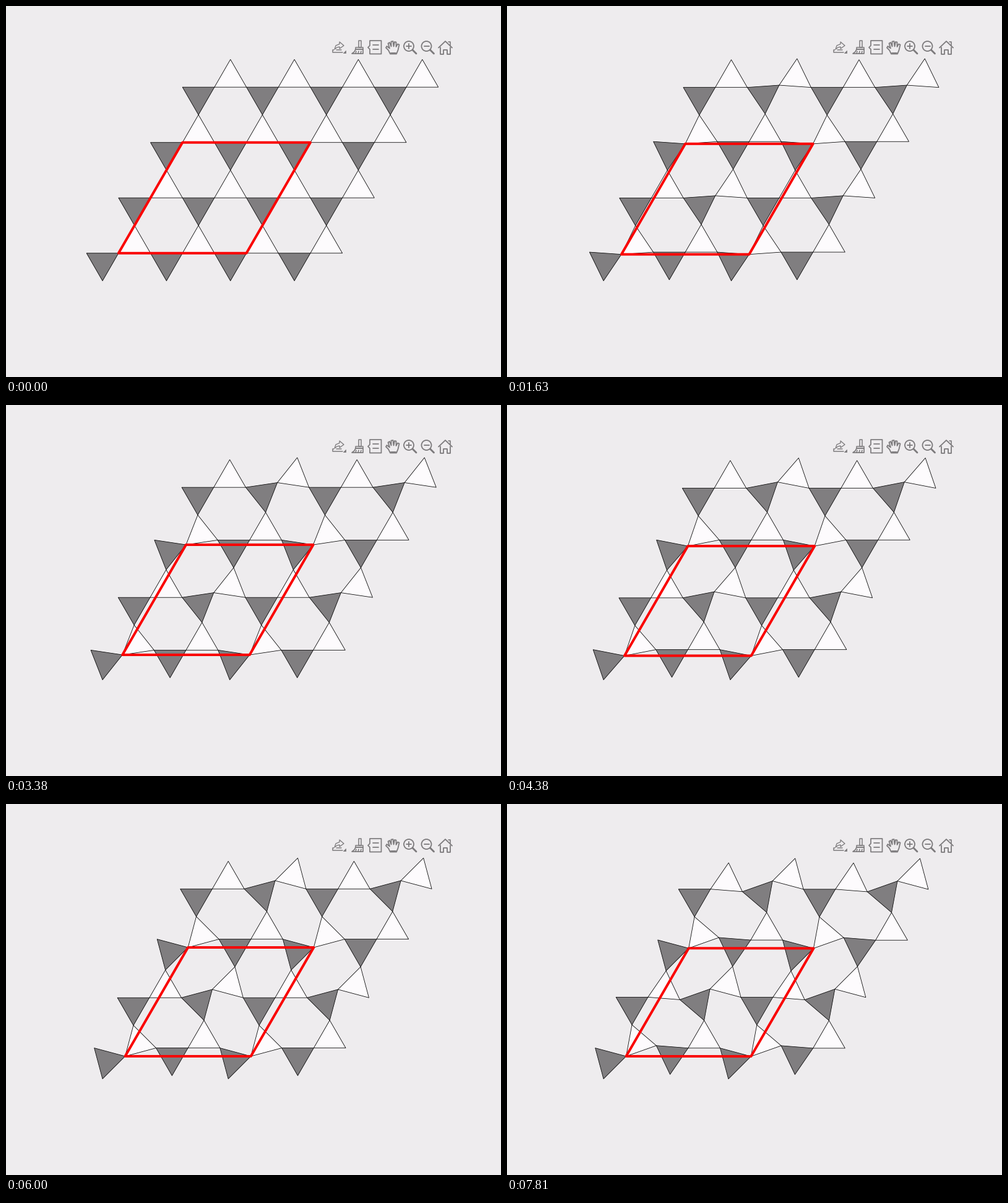
Write a matplotlib script that moves like this. It is 800 px wide and 600 px high and loops after 8 s.

```python
import numpy as np
import matplotlib.pyplot as plt
from matplotlib.animation import FuncAnimation
from matplotlib.collections import PolyCollection
from matplotlib.patches import Circle, Polygon

W, H, DPI = 800, 600, 100
PX = 72 / DPI
BG, WHITE, DARK = "#eeecee", "#fdfbfd", "#807e80"
ICON, RED = "#7c7a7c", "#fa0000"

SIDE = 51.68
ANCHOR = 156 + 444.5j      # fixed lowest corner of the first dark triangle
CELLS = 4
INTERVAL, LOOP = 20, 8000
BEATS = [190, 380, 630, 810]   # step times inside each second

fig = plt.figure(figsize=(W / DPI, H / DPI), dpi=DPI, facecolor=BG)
ax = fig.add_axes([0, 0, 1, 1])
ax.set_xlim(0, W)
ax.set_ylim(H, 0)
ax.axis("off")


def edge(deg):
    return SIDE * np.exp(1j * np.radians(deg))


def xy(points):
    points = np.asarray(points)
    return np.column_stack([points.real, points.imag])


def lattice(step):
    """Hinged rigid triangles, repeating every 2 x 2 cells."""
    twist = 0.5 * min(step, 30)
    lean = 0.5 * max(step - 30, 0)
    dark_rot = [[twist, lean], [0, -twist - lean]]
    white_rot = [[-twist - lean, 0], [lean, twist]]

    darks, whites, hinges = [], [], {}
    foot = ANCHOR
    for r in range(CELLS):
        for c in range(CELLS):
            d, w = dark_rot[r % 2][c % 2], white_rot[r % 2][c % 2]
            if c == 0:
                right = foot + edge(d - 60)
            else:
                right = whites[-1][1] + edge(d)
            darks.append([right - edge(d), right, right - edge(d - 60)])
            whites.append([right, right + edge(w), right + edge(w - 60)])
            hinges[r, c] = right
        foot = whites[-CELLS][2]
    cell = [hinges[k] for k in ((0, 0), (0, 2), (2, 2), (2, 0))]
    return darks, whites, cell


def stroke(points, width=1.7, closed=False, fill=False):
    ax.add_patch(Polygon(points, closed=closed, fill=fill, fc=ICON, ec=ICON,
                         lw=width * PX, joinstyle="round", capstyle="round"))


def export_icon(x, y):
    stroke([(x - 7, y + 3), (x - 5, y - 3), (x + 1, y - 5.5), (x + 1, y - 9),
            (x + 8, y - 3), (x + 1, y + 2), (x + 1, y - 1), (x - 3, y)],
           1.3, closed=True)
    stroke([(x - 8, y + 4), (x - 10, y + 4), (x - 10, y + 8), (x + 6, y + 8)], 1.5)
    stroke([(x - 4, y + 4), (x + 4, y + 4)], 1.5)
    stroke([(x + 11, y + 5), (x + 11, y + 9), (x + 7, y + 9)], 0.8, True, True)


def brush_icon(x, y):
    stroke([(x + 2, y - 11), (x + 6, y - 11), (x + 6, y), (x + 2, y)], 1.5, True)
    stroke([(x - 3, y), (x + 9, y), (x + 9, y + 3), (x - 3, y + 3)], 1.5, True)
    stroke([(x - 3, y + 3), (x + 9, y + 3), (x + 9, y + 10), (x - 9, y + 10),
            (x - 5, y + 7)], 1.7, True)
    for dx in (-2, 2, 6):
        stroke([(x + dx, y + 6), (x + dx - 1, y + 10)], 1.5)


def tip_icon(x, y):
    stroke([(x - 8, y - 11), (x + 10.5, y - 11), (x + 10.5, y + 10.5),
            (x - 8, y + 10.5), (x - 8, y + 3), (x - 11, y), (x - 8, y - 3)],
           1.7, True)
    for dy in (-4, 3):
        stroke([(x - 3.5, y + dy), (x + 6, y + dy)])


def hand_icon(x, y):
    stroke([(x - 4, y + 10), (x - 7, y + 4), (x - 11, y), (x - 9.5, y - 2.5),
            (x - 5, y + 1), (x - 7.5, y - 7), (x - 5, y - 8.5), (x - 2.5, y - 2),
            (x - 2.5, y - 10), (x + 0.5, y - 10.5), (x + 1.5, y - 2),
            (x + 3, y - 9.5), (x + 5.5, y - 9), (x + 5.5, y - 1.5),
            (x + 8, y - 6), (x + 10.5, y - 5), (x + 8.5, y + 4), (x + 6, y + 10)],
           1.8, True)
    stroke([(x - 3, y + 8), (x + 5, y + 8)], 1.8)


def zoom_icon(x, y, plus):
    cx, cy = x - 2, y - 2.5
    ax.add_patch(Circle((cx, cy), 8, fill=False, ec=ICON, lw=1.8 * PX))
    stroke([(cx - 4, cy), (cx + 4, cy)], 1.8)
    if plus:
        stroke([(cx, cy - 4), (cx, cy + 4)], 1.8)
    stroke([(cx + 6, cy + 6), (cx + 12, cy + 12)], 2.8)


def home_icon(x, y):
    stroke([(x - 11, y), (x, y - 10.5), (x + 11, y)], 1.8)
    stroke([(x - 8, y - 1), (x - 8, y + 10.5), (x - 3, y + 10.5), (x - 3, y + 3),
            (x + 3, y + 3), (x + 3, y + 10.5), (x + 8, y + 10.5), (x + 8, y - 1)],
           1.8)
    stroke([(x + 5, y - 9.5), (x + 7.5, y - 9.5), (x + 7.5, y - 4)], 1.6)


export_icon(538, 67)
brush_icon(568, 67)
tip_icon(596, 67)
hand_icon(625, 67.5)
zoom_icon(653, 67.5, True)
zoom_icon(681.5, 67.5, False)
home_icon(710, 67.5)

style = dict(edgecolors="black", linewidths=0.8 * PX, snap=False)
white_tris = PolyCollection([], facecolors=WHITE, **style)
dark_tris = PolyCollection([], facecolors=DARK, **style)
ax.add_collection(white_tris, autolim=False)
ax.add_collection(dark_tris, autolim=False)
outline = Polygon([(0, 0)] * 4, fill=False, ec=RED, lw=4 * PX,
                  joinstyle="round", snap=False, zorder=5)
ax.add_patch(outline)


def update(frame):
    second, ms = divmod(frame * INTERVAL + INTERVAL // 2, 1000)
    step = 5 * second + int(np.searchsorted(BEATS, ms, side="right"))
    darks, whites, cell = lattice(step)
    dark_tris.set_verts([xy(t) for t in darks])
    white_tris.set_verts([xy(t) for t in whites])
    outline.set_xy(xy(cell))
    return white_tris, dark_tris, outline


anim = FuncAnimation(fig, update, frames=LOOP // INTERVAL, interval=INTERVAL,
                     init_func=lambda: update(0), repeat=True, repeat_delay=0)
plt.show()
```
